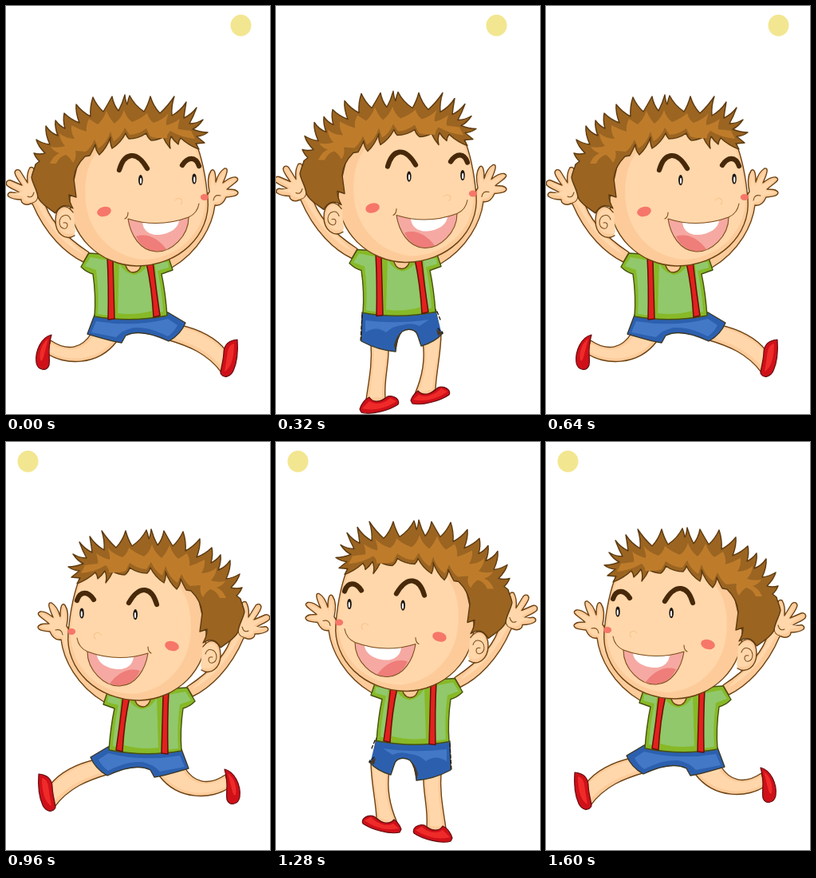
An HTML page that plays this animation: 331 by 510 pixels, repeating every 1.92 s.

```html
<!DOCTYPE html>
<html lang="en">
<head>
<meta charset="utf-8">
<title>Running boy</title>
<style>
  html, body { margin: 0; width: 100%; height: 100%; overflow: hidden; background: #fff; }
  svg { display: block; width: 331px; height: 510px; }
  path, ellipse { stroke-linejoin: round; stroke-linecap: round; }
  .skin { fill: #fdcb9a; stroke: #6d4212; stroke-width: 1.4; }
  .tone { fill: #ffd7aa; }
  .line { fill: none; stroke: #7d4e1c; stroke-width: 1.1; }
  .hair { fill: #9b6421; stroke: #5c3a10; stroke-width: 1.4; }
  .glow { fill: #be7c2b; }
  .brow { fill: none; stroke: #47290a; stroke-width: 6.2; }
  .shirt { fill: #87b927; stroke: #47500f; stroke-width: 1.4; }
  .cloth { fill: #91c86b; }
  .strap { fill: #e3211e; stroke: #640f0c; stroke-width: 1.5; }
  .shorts { fill: #2c60af; stroke: #3b3520; stroke-width: 1.3; }
  .denim { fill: #4278c6; }
  .worn { fill: #4b3820; }
  .shoe { fill: #cf1019; stroke: #640d10; stroke-width: 1.2; }
  .shine { fill: #ef2b29; }
  .blush { fill: #f6766a; }
</style>
</head>
<body>
<svg viewBox="0 0 331 510">
  <ellipse id="sun" cy="24.3" rx="13" ry="13.5" fill="#f3e691"/>
  <g id="boy">
    <g id="arms">
      <path class="skin" d="M31 247 C25 250 19 247 19 242 C13 242 7 241 3 238 C1 235 4 232 8 233 L18 234
        C12 230 5 228 1 224 C-1 220 2 217 6 218 L20 224 C15 217 11 212 11 208 C12 203 17 204 19 208 L27 221
        C26 213 27 207 30 202 C34 200 36 204 36 209 L37 224 C42 230 46 236 47 241
        C52 264 72 287 104 308 L97 320 C76 310 50 287 33 247Z"/>
      <path class="tone" d="M20 238 L5 235 L21 232 L4 221 L23 226 L14 207 L28 224 L32 204 L36 227 Q44 233 45 243
        Q51 268 82 295 L98 311 Q64 295 39 248 L33 244 Q24 246 20 238Z"/>
      <path class="line" d="M27 238 Q33 241 35 233 M33 246 Q39 245 40 238"/>
      <path class="skin" d="M247 244 L255 232 C253 223 253 212 257 206 C261 202 263 208 263 220
        C265 213 269 206 274 203 C279 202 278 208 272 221 C277 217 283 213 288 214 C293 216 290 219 286 222
        L277 229 C283 229 289 229 291 233 C291 237 286 238 276 239 C273 246 268 250 262 249
        C259 274 242 307 208 327 L198 315 C230 300 242 275 247 244Z"/>
      <path class="tone" d="M256 233 L258 208 L262 225 L275 205 L270 224 L288 216 L275 230 L289 233 L274 237
        Q270 246 260 246 Q256 276 216 316 Q246 282 252 246Z"/>
      <path class="line" d="M260 243 Q261 235 269 237"/>
    </g>

    <g id="run">
      <path class="skin" d="M107 409 C96 427 78 433 56 418 L51 434 C72 449 115 451 139 419Z"/>
      <path class="tone" d="M110 412 C98 430 79 435 57 422 L55 433 C80 445 112 444 133 420Z"/>
      <path class="skin" d="M219 399 C242 404 264 415 276 431 L270 458 C252 434 229 425 202 417Z"/>
      <path class="tone" d="M220 402 C244 408 262 419 274 432 L270 450 C253 431 231 421 207 414Z"/>
      <path class="shoe" d="M57 411 C44 414 36 432 38 446 C40 456 51 457 54 449 C56 437 51 432 57 411Z"/>
      <path class="shine" d="M53 416 C45 421 41 434 43 443 C47 446 48 433 53 416Z"/>
      <path class="shoe" d="M290 417 C279 418 274 423 273 432 C273 442 270 449 269 459 C273 466 281 464 285 456 C290 445 291 430 290 417Z"/>
      <path class="shine" d="M286 422 C277 424 278 434 276 445 L274 457 C283 452 286 438 286 422Z"/>
      <path class="shorts" d="M111 386 L102 410 C116 414 131 419 145 421 L150 412 C164 405 185 410 204 419
        C213 414 221 406 225 396 L203 383Z"/>
      <path class="denim" d="M113 394 L107 408 L138 414 Q146 405 160 402 C178 401 191 407 203 413 Q211 407 215 399
        L203 391 Q160 402 113 394Z"/>
    </g>

    <g id="stand" transform="translate(2 4.5)">
      <path class="skin" d="M119 422 C121 448 116 470 113 492 Q125 499 137 490 C135 468 142 446 141 427Z"/>
      <path class="tone" d="M122 427 C124 450 119 470 117 490 L133 489 C132 468 139 445 138 428Z"/>
      <path class="skin" d="M184 420 C188 446 182 467 174 485 Q188 491 200 479 C201 456 207 434 207 408Z"/>
      <path class="tone" d="M187 420 C191 447 185 467 178 484 L196 479 C198 455 205 433 204 413Z"/>
      <path class="shoe" d="M105 504 C107 497 112 491 117 489 C122 497 132 495 140 488 C148 486 156 492 153 498 C143 505 119 512 107 508Z"/>
      <path class="shine" d="M108 503 L117 494 C126 500 137 496 143 490 L151 494 C140 502 122 507 108 503Z"/>
      <path class="shoe" d="M169 493 C171 487 174 484 178 481 C184 488 194 486 203 477 C211 474 220 480 217 486 C207 493 184 500 171 497Z"/>
      <path class="shine" d="M172 492 L179 486 C189 491 200 485 207 478 L215 482 C204 490 187 496 172 492Z"/>
      <path class="shorts" d="M108 383 L107 419 C120 426 136 431 150 432 C151 421 153 412 158 407 C166 402 176 404 178 413
        L182 425 C193 422 203 416 209 409 L200 379Z"/>
      <path class="denim" d="M112 393 L112 408 Q126 399 138 408 Q146 400 158 399 Q170 395 180 400 L192 392 Q150 398 112 393Z"/>
      <path class="worn" d="M150 431 L154 412 L158 407 Q152 410 148 424Z M201 404 L209 409 L203 412Z"/>
      <path d="M203 384 L208 405" fill="none" stroke="#fff" stroke-width="3"/>
      <path d="M202 382 L206 392 M203 403 L209 409 M108 386 L106 419" fill="none"
        stroke="#1d1812" stroke-width="1.3" stroke-dasharray="4 3"/>
    </g>

    <g id="top">
      <path class="shirt" d="M104 309 L94 326 Q101 333 109 335 Q113 362 111 388 Q156 396 202 387 Q200 359 195 335 L209 330 L204 315Z"/>
      <path class="cloth" d="M106 314 L99 325 L113 330 Q117 359 115 385 L130 387 L128 318Z
        M142 322 Q149 334 160 336 Q169 335 176 326 Q182 354 183 381 Q162 387 140 384Z
        M187 321 L203 320 L204 327 L190 331 Q196 360 197 382 L192 383Z"/>
      <path class="skin" d="M149 320 Q151 333 160 333 Q169 332 170 320Z"/>
      <path class="strap" d="M127 314 L134 318 Q135 355 136 391 L128 392 Q129 350 127 314Z"/>
      <path class="strap" d="M176 321 L184 318 Q188 354 193 387 L185 389 Q183 352 176 321Z"/>
    </g>

    <g id="head">
      <path class="skin" d="M96 170 L80 240 C78 286 117 324 164 325 C217 325 257 286 253 241 C251 217 247 192 237 168
        C195 136 135 138 96 170Z"/>
      <path class="tone" d="M116 180 C99 199 96 230 102 257 C111 292 139 314 172 317 C214 316 249 285 250 243
        C249 216 244 192 234 171 C199 150 150 152 116 180Z"/>
      <path class="skin" d="M84 258 C74 244 62 252 62 268 C62 285 75 294 86 287"/>
      <path class="tone" d="M85 260 C75 248 65 254 65 268 C65 281 76 289 87 283Z"/>
      <path class="line" d="M81 267 C78 258 68 261 67 270 C67 279 77 281 77 274 Q77 270 72 271"/>
      <path class="hair" d="M62 259 C52 252 43 246 40 239 C39 229 33 222 32 214 C33 208 36 203 37 198 L42 194
        Q38 191 35 184 Q42 186 49 184 Q40 175 38 167 Q46 172 55 173 Q49 160 50 150 Q56 159 65 162
        Q61 152 62 143 Q67 150 74 153 Q71 143 73 134 Q81 142 92 146 Q87 133 88 123 Q96 133 106 138
        Q105 126 109 114 Q114 125 122 132 Q127 124 133 113 Q135 124 141 131 Q146 122 149 111
        Q150 120 152 123 Q153 117 155 112 Q161 124 173 132 Q178 124 181 113 Q185 126 193 134
        Q203 125 211 113 Q207 125 208 137 Q219 131 226 120 Q224 131 223 140 Q232 136 239 127
        Q235 138 230 147 Q239 147 247 142 Q241 151 234 154 Q244 158 253 158 Q246 163 239 163
        L249 171 L238 172 L242 179 Q230 175 219 165 Q216 169 216 173 Q211 169 207 163 Q204 170 206 178
        Q200 171 197 164 Q189 168 182 168 Q177 164 176 159 Q166 166 154 166 Q151 163 150 159
        Q144 171 133 178 Q130 171 131 164 Q126 178 117 186 Q112 180 112 173 Q108 182 105 187 L99 188
        Q86 201 85 216 L88 239 L79 236 Q79 245 84 253 Q70 244 62 259Z"/>
      <path class="glow" d="M55 197 Q59 187 67 184 Q60 182 56 176 Q66 178 74 175 Q67 167 67 159 Q75 166 86 166
        Q81 158 82 149 Q91 154 101 157 Q100 149 104 141 Q110 145 115 148 Q122 142 126 131 Q130 141 136 147
        Q145 140 148 130 Q151 140 158 145 Q169 141 177 134 Q179 142 185 146 Q197 142 204 134 Q200 144 201 149
        Q210 147 218 141 Q215 150 216 154 L232 156 L237 166 Q219 164 206 156 Q201 161 202 165
        Q189 166 181 163 L176 153 Q165 161 155 161 L149 152 Q144 164 135 169 L131 157 Q126 172 116 178
        L111 167 Q106 178 100 182 L87 181 Q89 190 84 196 Q80 189 75 186 Q67 188 63 197Z"/>
      <path class="brow" d="M142 205 C148 184 163 179 177 203"/>
      <path class="brow" d="M221 199 C228 188 238 188 242 200"/>
      <g id="eyes" fill="#1c1713">
        <ellipse cx="168.8" cy="217.6" rx="2.8" ry="6.6"/>
        <ellipse cx="236" cy="216" rx="2.8" ry="6.6"/>
        <ellipse cx="169" cy="218.5" rx="1.1" ry="3.7" fill="#fff"/>
        <ellipse cx="236.2" cy="217" rx="1.1" ry="3.7" fill="#fff"/>
      </g>
      <path class="line" d="M212 243 Q216 238 220 242 Q222 245 219 248" style="stroke:#f7c48e"/>
      <ellipse class="blush" cx="123" cy="257" rx="9" ry="6" transform="rotate(-15 123 257)"/>
      <ellipse class="blush" cx="248.8" cy="239" rx="5" ry="4"/>
      <path d="M153 266 Q191 278 229 264 C229 288 207 308 188 307 C168 306 156 286 153 266Z" fill="#f5a9a2"/>
      <path d="M163 288 C178 283 192 292 201 304 Q189 309 178 304 Q168 299 163 288Z" fill="#ef7d79"/>
      <path d="M171 270 Q196 274 217 268 C216 279 202 287 186 286 Q172 283 171 270Z" fill="#fff"/>
      <path class="line" d="M153 266 Q191 278 229 264 C229 288 207 308 188 307 C168 306 156 286 153 266Z
        M149 266 Q153 264 153 258 M229 264 Q240 259 242 247"/>
    </g>
  </g>
</svg>
<script>
  const STEP = 320;
  // Each pose: sun x, facing, offset x and y, legs.
  const poses = [
    [294.5, 1, 0, 0, "run"],
    [276.5, 1, -2, -4.5, "stand"],
    [291.5, 1, 0, 0, "run"],
    [27.5, -1, 331, -2, "run"],
    [27.5, -1, 328, -13.5, "stand"],
    [27.5, -1, 326, -4, "run"]
  ];
  const byId = id => document.getElementById(id);
  const sun = byId("sun"), boy = byId("boy"), legs = [byId("run"), byId("stand")];
  const start = performance.now();

  function draw() {
    const time = performance.now() - start;
    const [sunX, facing, x, y, stance] = poses[Math.floor(time / STEP) % poses.length];
    sun.setAttribute("cx", sunX);
    boy.setAttribute("transform", `translate(${x} ${y}) scale(${facing} 1)`);
    for (const leg of legs) leg.style.display = leg.id === stance ? "" : "none";
    requestAnimationFrame(draw);
  }
  draw();
</script>
</body>
</html>
```
